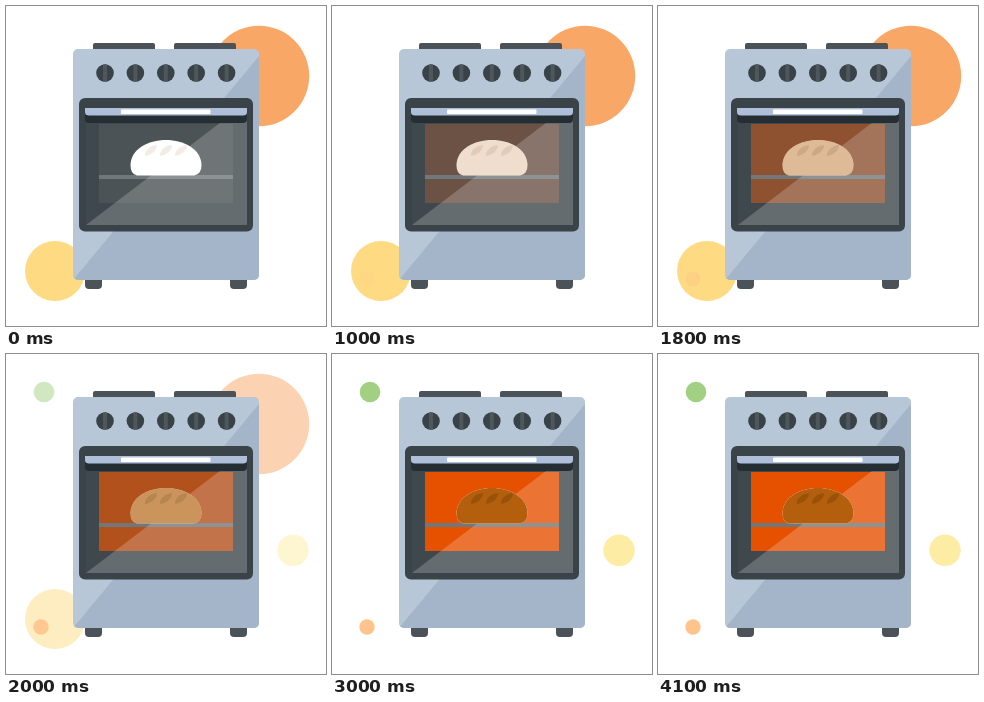
These frames come from a looping animation (320 px wide and 320 px high, 4500 ms). An HTML page:

```html
<!DOCTYPE html>
<html lang="en">
<head>
<meta charset="utf-8">
<title>Baking bread</title>
<style>
  html, body { margin: 0; width: 100%; height: 100%; overflow: hidden; background: #fff; }
  svg { display: block; width: 100vw; height: 100vh; }
</style>
</head>
<body>
<svg viewBox="0 0 320 320">
  <defs>
    <clipPath id="bodyClip"><rect x="67" y="43" width="186" height="231" rx="5"/></clipPath>
    <path id="loaf" d="M131 169.500Q124.500 168.500 124.500 159C125 143 142 134 160 134S195 143 195.500 159Q195.500 168.500 188 169.500Z"/>
    <path id="cut" d="M-6 5.500C-6.500 0 -1 -5 6 -5.500C6 0 0 5 -6 5.500Z"/>
    <g id="cuts">
      <use href="#cut" x="145" y="144.500"/>
      <use href="#cut" x="160" y="144.500"/>
      <use href="#cut" x="175" y="144.500"/>
    </g>
    <path id="foot" d="M0 273H17V279Q17 283 13 283H4Q0 283 0 279Z"/>
    <g id="knob">
      <circle r="8.800" fill="#384247"/>
      <rect x="-2" y="-8.500" width="4" height="17" fill="#4d575c"/>
    </g>
  </defs>

  <g class="large">
    <circle cx="253" cy="70" r="50.200" fill="#f9a766"/>
    <circle cx="49" cy="265" r="30" fill="#fedb83"/>
  </g>
  <g class="small">
    <circle cx="38" cy="38" r="10.300" fill="#a1d083"/>
    <circle cx="287" cy="196.300" r="15.700" fill="#fdeca3"/>
  </g>
  <circle class="dot" cx="35" cy="273" r="7.700" fill="#ffc48b"/>

  <g fill="#4b5359">
    <path d="M87 44V39Q87 37 89 37H147Q149 37 149 39V44ZM168 44V39Q168 37 170 37H228Q230 37 230 39V44Z"/>
    <use href="#foot" x="79"/>
    <use href="#foot" x="224"/>
  </g>
  <g clip-path="url(#bodyClip)">
    <rect x="67" y="43" width="186" height="231" fill="#b7c7d8"/>
    <path d="M253 50V274H67Z" fill="#a4b5c9"/>
  </g>
  <g id="knobs"></g>

  <rect x="73" y="92" width="174" height="133.500" rx="6" fill="#3a4347"/>
  <rect x="80" y="105" width="161" height="114" fill="#3f484c"/>
  <rect x="93" y="118" width="134" height="79" fill="#4c5356"/>
  <rect class="heat" x="93" y="118" width="134" height="79" fill="#e65100"/>
  <rect x="93" y="169" width="134" height="4" fill="#70787b"/>
  <path d="M80 219L223 110H241V219Z" fill="#fff" opacity=".2"/>

  <use href="#loaf" fill="#fff"/>
  <use href="#cuts" fill="#f3ece6"/>
  <g class="heat">
    <use href="#loaf" fill="#b35f0d"/>
    <use href="#cuts" fill="#9a5208"/>
  </g>

  <path d="M79 106H241V113Q241 117 237 117H83Q79 117 79 113Z" fill="#252e32"/>
  <path d="M79 102H241V106Q241 109.500 237 109.500H83Q79 109.500 79 106Z" fill="#afbfda"/>
  <rect x="115" y="103.500" width="89.500" height="4.500" rx="1" fill="#fff"/>
</svg>
<script>
  const DURATION = 4500;
  const TIMES = [0, 1000, 1500, 2000, 2500, 3000, 3500, DURATION];
  const OPACITY = {
    heat: [0, 0.2, 0.43, 0.67, 0.87, 1, 1],
    large: [1, 1, 1, 0.5, 0, 0, 0],
    small: [0, 0, 0, 0.5, 1, 1, 1],
    dot: [0, 0.15, 0.45, 0.9, 1, 1, 1]
  };

  document.getElementById("knobs").innerHTML = Array.from({ length: 5 }, (_, i) =>
    `<use href="#knob" x="${99 + i * 30.4}" y="67"/>`).join("");

  // Every level is held until the next step.
  for (const [name, levels] of Object.entries(OPACITY)) {
    const frames = TIMES.map((time, i) => ({
      offset: time / DURATION,
      opacity: levels[Math.min(i, levels.length - 1)],
      easing: "step-end"
    }));
    for (const part of document.querySelectorAll("." + name)) {
      part.animate(frames, { duration: DURATION, iterations: Infinity });
    }
  }
</script>
</body>
</html>
```
